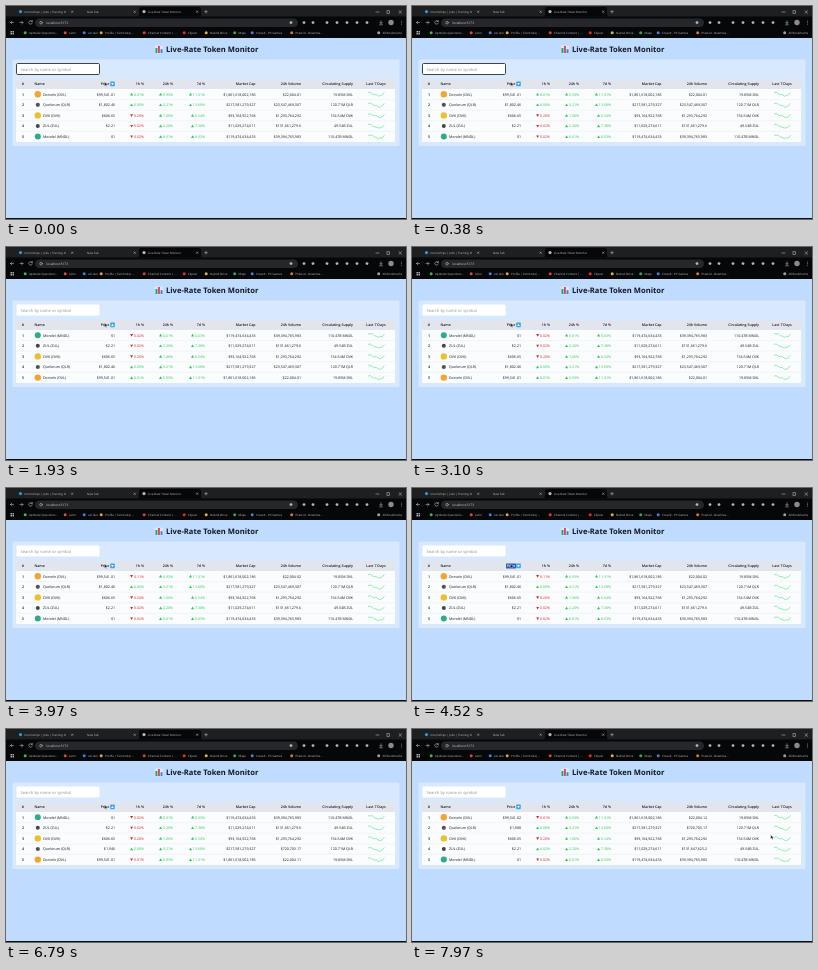
An HTML page that plays this animation: 400x213 px, repeating every 8 s.

```html
<!DOCTYPE html>
<html lang="en">
<head>
<meta charset="utf-8">
<title>Live-Rate Token Monitor</title>
<style>
  html, body { margin: 0; width: 100%; height: 100%; overflow: hidden; background: #bfdbfe; }
  svg { display: block; width: 100vw; height: 100vh; }
  text { font-family: "Open Sans", "Noto Sans", sans-serif; font-size: 3.6px; fill: #111827; text-rendering: geometricPrecision; }
  .end { text-anchor: end; }
  .mid { text-anchor: middle; }
  .head { font-size: 3.55px; font-weight: 600; }
  .rank { font-weight: 600; }
  .title { font-size: 7.6px; font-weight: 700; }
  .hint { font-size: 4.1px; fill: #8b929d; }
  .tab, .mark { font-size: 2.95px; fill: #bfc2c6; }
  .url { font-size: 3.2px; fill: #d4d6d9; }
  .up { fill: #2bcb57; }
  .down { fill: #dc2626; }
  .line { fill: none; stroke: #62e38f; stroke-width: .65; stroke-linejoin: round; }
  .glyph { fill: none; stroke: #b4b7bb; stroke-width: .6; stroke-linecap: round; }
</style>
</head>
<body>
<svg viewBox="0 0 400 213" preserveAspectRatio="none">
  <g id="browser">
    <rect width="400" height="32" fill="#060708"/>
    <rect width="400" height="10.500" fill="#1d1f21"/>
    <path d="M131 10.500q2 0 2-2V3q0-2 2-2h58q2 0 2 2v5.500q0 2 2 2z" fill="#060708"/>
    <rect x="29" y="12.500" width="263" height="8.500" rx="4.250" fill="#25272a"/>
    <path class="glyph" d="M7.500 16.500H4.500m1.400-1.400-1.400 1.400 1.400 1.400M14 16.500h3m-1.400-1.400 1.400 1.400-1.400 1.400M26.200 15.500a1.800 1.800 0 1 0 .1 1.600m0-2.700v1.200h-1.200M370 6h3M393 4.700l2.600 2.600m0-2.600-2.600 2.600M65.500 5l1.400 1.400m0-1.400-1.400 1.400M128 5l1.400 1.400m0-1.400L128 6.400M190.500 5l1.400 1.400m0-1.400-1.400 1.400M198.700 5.700h2.600m-1.300-1.300V7"/>
    <rect class="glyph" x="381" y="4.700" width="2.600" height="2.600"/>
    <circle class="glyph" cx="35" cy="16.700" r="1.300"/>
    <path class="glyph" d="M375 14.800v2.600m-1.200-1.100 1.200 1.200 1.200-1.200m-2.600 2.500h2.800M395.500 15v.1m0 1.500v.1m0 1.500v.1"/>
    <path d="M4.500 25h1.500v1.500H4.500zm2 0H8v1.500H6.500zm-2 2H6v1.500H4.500zm2 0H8v1.500H6.500z" fill="#a9acb0"/>
    <circle cx="385" cy="16.500" r="2.700" fill="#8f8a84"/>
  </g>
  <rect y="32" width="400" height="180" fill="#bfdbfe"/>
  <rect y="212" width="400" height="1" fill="#0b0c0e"/>
  <rect x="6.500" y="53.500" width="387" height="86.500" rx="1.500" fill="#d8e8fd"/>
  <g id="bars">
    <rect x="148.800" y="39.500" width="8.400" height="7.800" rx=".7" fill="#dce9f2"/>
    <rect x="149.500" y="42" width="1.900" height="5" fill="#22a06b"/>
    <rect x="152" y="40" width="1.900" height="7" fill="#e0455e"/>
    <rect x="154.600" y="43.200" width="1.900" height="3.800" fill="#2f86dd"/>
  </g>
  <text class="title" x="160" y="45.900">Live-Rate Token Monitor</text>
  <rect id="search" x="10.500" y="57.500" width="83" height="11" rx="1.200" fill="#fff"/>
  <text class="hint" x="14.500" y="64.600">Search by name or symbol</text>
  <rect x="10" y="73" width="379" height="63" rx="1" fill="#fafcfd"/>
  <rect x="10" y="73" width="379" height="10" rx="1" fill="#e2e6ec"/>
  <rect id="mark" x="94" y="75.500" width="10" height="5" fill="#2c62b4"/>
  <g id="heads"></g>
  <rect x="104.200" y="75.600" width="4.600" height="4.600" rx=".7" fill="#35a9ee"/>
  <path id="arrow" fill="#fff"/>
  <g id="table"></g>
  <path id="cursor" d="M0 0v3.900l.9-.8.6 1.400.7-.3-.6-1.300h1.200z" fill="#111" stroke="#fff" stroke-width=".25"/>
</svg>
<script>
const LOOP = 8000;
const NS = 'http://www.w3.org/2000/svg';
const $ = id => document.getElementById(id);

function add(parent, tag, attrs, label) {
  const el = document.createElementNS(NS, tag);
  for (const k in attrs) el.setAttribute(k, attrs[k]);
  if (label !== undefined) el.textContent = label;
  parent.appendChild(el);
  return el;
}
const write = (parent, cls, x, y, label) => add(parent, 'text', { class: cls, x, y }, label);
const dot = (parent, cx, cy, r, fill) => add(parent, 'circle', { cx, cy, r, fill });

// browser labels: text x, label, icon colour
[[18.5, 'Internships | Jobs | Training O', '#2b9be0'],
 [81, 'New Tab', ''],
 [142, 'Live-Rate Token Monitor', '#b8b8be']].forEach(([x, label, fill]) => {
  if (fill) dot($('browser'), x - 4, 5.6, 1.6, fill);
  write($('browser'), 'tab', x, 6.7, label);
});
write($('browser'), 'url', 40.5, 17.8, 'localhost:5173');
[[23, 'Aptitude Questions...', '#4caf50'], [63, 'Letro', '#dc4a3f'],
 [82, 'vel.dun', '#3f7fe0'], [99, 'Profile | TarnCode|...', '#e6a23c'],
 [142, 'Channel Content | ...', '#e23b3b'], [182, 'Clipvar', '#e52d27'],
 [204, 'Nubrel Drive', '#e0b533'], [232.5, 'Maps', '#37a45a'],
 [250, 'Cravolt - PC Games', '#4a7fd6'], [289.5, 'PraxLid - Downloa...', '#d77838'],
 [376.5, 'All Bookmarks', '#9da1a6']].forEach(([x, label, fill]) => {
  dot($('browser'), x - 3.8, 26.8, 1.5, fill);
  write($('browser'), 'mark', x, 27.9, label);
});
[285, 298, 307, 321, 331, 341, 351, 361].forEach(x => dot($('browser'), x, 16.6, 1.4, '#b4b7bb'));

// table head
[['mid', 17, '#'], ['', 28.5, 'Name'], ['end', 103.2, 'Price'], ['end', 138, '1h %'],
 ['end', 167, '24h %'], ['end', 199, '7d %'], ['end', 249.5, 'Market Cap'],
 ['end', 295, '24h Volume'], ['end', 347, 'Circulating Supply'], ['mid', 370, 'Last 7 Days']]
  .forEach(([cls, x, label]) => write($('heads'), 'head ' + cls, x, 79.2, label));
const priceHead = $('heads').children[2];

// a list of [time, value] pairs is a value that changes over the loop
const coins = [
  { name: 'Dorveln (DVL)', fill: '#f2a531', r: 3.2,
    price: [[0, '$99,541.01'], [7200, '$99,541.02']],
    pct: [[[0, .01], [3560, -.11], [4900, -.01]], 6.93, 11.31],
    cap: '$1,861,618,002,186',
    vol: [[0, '$22,004.01'], [3900, '$22,004.02'], [4900, '$22,004.03'], [6300, '$22,004.11'], [7200, '$22,004.12']],
    supply: '19.85M DVL', line: [-1, -1.6, -.4, .4, .2, 1.5, 1.1, .6, -1.4] },
  { name: 'Quelorum (QLR)', fill: '#4b5563', r: 2.1,
    price: [[0, '$1,802.46'], [4900, '$1,946'], [7200, '$1,980']],
    pct: [[[0, .001], [4900, .08]], 3.21, 13.68],
    cap: '$217,581,279,327', vol: [[0, '$23,547,469,307'], [4900, '$720,703.17']],
    supply: '120.71M QLR', line: [-.8, -1.4, -.6, .5, .3, 1.6, 1.8, .7, -1.2] },
  { name: 'OVK (OVK)', fill: '#edc02f', r: 3.2, price: '$606.65', pct: [-.2, 1.06, 6.54],
    cap: '$93,164,922,768', vol: '$1,293,764,292',
    supply: '154.54M OVK', line: [-.7, -1.5, -.3, .3, .1, 1.3, 1.8, 1, -1] },
  { name: 'ZUL (ZUL)', fill: '#3f4650', r: 2, price: '$2.21', pct: [[[0, -.02], [7200, .02]], 2.2, 7.38],
    cap: '$11,029,274,611', vol: [[0, '$131,661,279.6'], [7200, '$131,647,625.2']],
    supply: '49.54B ZUL', line: [-1, -1.5, -.4, .6, .8, 1.5, 1.4, .8, -.9] },
  { name: 'Mondel (MNDL)', fill: '#2eaa8d', r: 3, price: '$1', pct: [-.02, .01, .03],
    cap: '$119,474,634,433', vol: '$39,394,765,983',
    supply: '110.47B MNDL', line: [-1.2, -.9, -1.3, .3, .7, 1.6, .9, 1.2, -1.1] }
];
const flips = [1600, 3300, 4160, 4400, 4920, 7400];
const at = (v, t) => Array.isArray(v) ? v.filter(s => s[0] <= t).pop()[1] : v;

function drawChange(g, x, value) {
  const label = Math.abs(value).toFixed(2) + '%';
  const cls = value < 0 ? 'down' : 'up';
  const left = x - ((label.length - 2) * .57 + 1.08) * 3.6 - 3.9;
  const tri = value < 0 ? 'v.4h3l-1.500 2.600z' : 'm0 2.800h3l-1.500-2.700z';
  add(g, 'path', { class: cls, d: `M${left} -1.500${tri}` });
  write(g, cls + ' end', x, 1.3, label);
}

function drawRow(coin, i, t) {
  const g = add($('table'), 'g', { transform: `translate(0 ${88.2 + i * 10.6})` });
  if (i) add(g, 'path', { d: 'M10-5.200H389', stroke: '#e6e9ed', 'stroke-width': .4 });
  write(g, 'rank mid', 17, 1.3, i + 1);
  dot(g, 31.8, 0, coin.r, coin.fill);
  write(g, '', 37, 1.3, coin.name);
  write(g, 'end', 109, 1.3, at(coin.price, t));
  [138, 167, 199].forEach((x, n) => drawChange(g, x, at(coin.pct[n], t)));
  write(g, 'end', 249.5, 1.3, coin.cap);
  write(g, 'end', 295, 1.3, at(coin.vol, t));
  write(g, 'end', 347, 1.3, coin.supply);
  const points = coin.line.map((y, n) => `${362 + n * 2.05},${y * 1.3}`).join(' ');
  add(g, 'polyline', { class: 'line', points });
}

const changes = [430, 3560, 3900, 4900, 6300, 7200, ...flips];
let shown = -1;

function drawTable(t) {
  const step = changes.filter(c => c <= t).length;
  if (step === shown) return;
  shown = step;
  const rising = flips.filter(c => c <= t).length % 2;
  const list = rising ? [...coins].reverse() : coins;
  $('table').replaceChildren();
  list.forEach((coin, i) => drawRow(coin, i, t));
  $('arrow').setAttribute('d', rising ? 'M105.200 78.900h2.600l-1.300-2.200z' : 'M105.200 77h2.600l-1.300 2.200z');
  $('search').setAttribute('stroke', t < 430 ? '#3d434c' : 'none');
  const selected = t >= 4400 && t < 4920;
  $('mark').setAttribute('opacity', selected ? 1 : 0);
  priceHead.style.fill = selected ? '#e8eefa' : '';
}

function frame() {
  const t = performance.now() % LOOP;
  drawTable(t);
  const p = Math.min(1, Math.max(0, (t - 7480) / 480));
  const e = p * p * (3 - 2 * p);
  $('cursor').setAttribute('transform', `translate(${98.5 + 260.3 * e} ${76 + 30 * e})`);
  requestAnimationFrame(frame);
}
frame();
</script>
</body>
</html>
```
